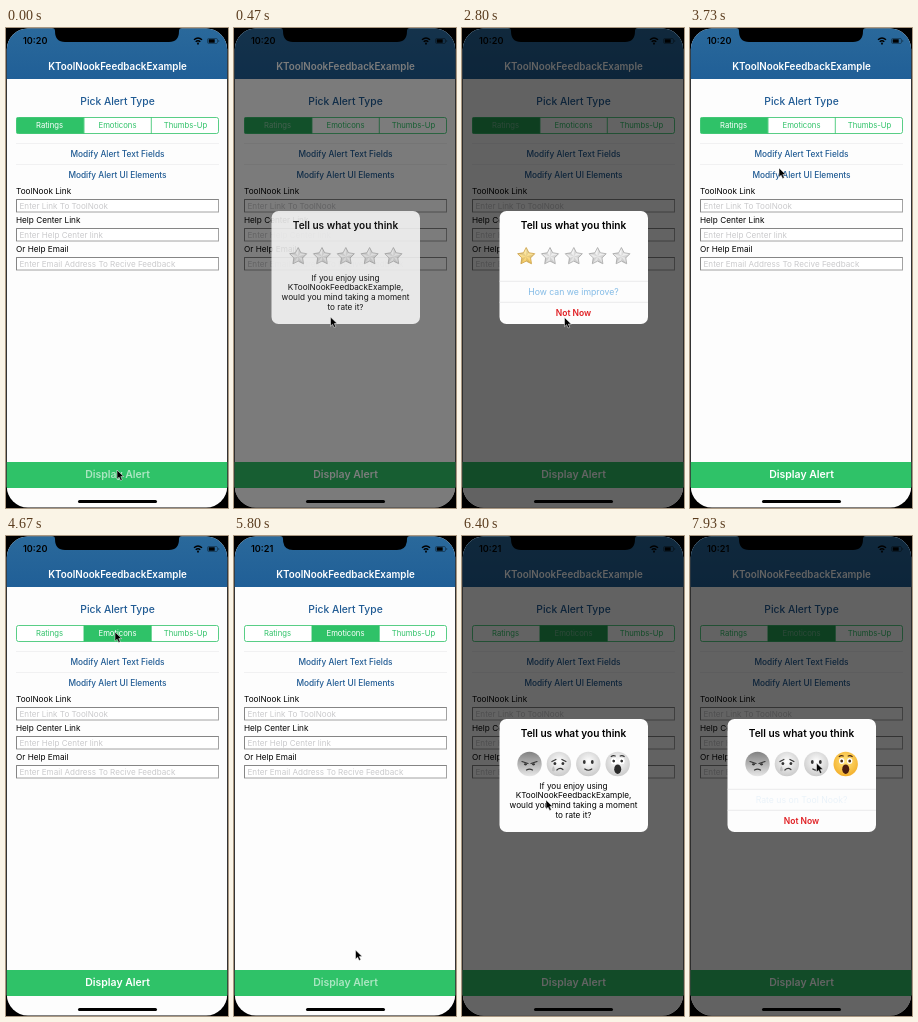
An HTML page that plays this animation: 222 by 480 pixels, repeating every 8000 ms.

```html
<!DOCTYPE html>
<html lang="en">
<head>
<meta charset="utf-8">
<style>
  html, body { margin: 0; width: 100%; height: 100%; overflow: hidden; background: #000; }
  svg { display: block; width: 100%; height: 100%; }
  text { font-family: Inter, Roboto, sans-serif; font-size: 8.2px; }
  .mid { text-anchor: middle; }
  .bold { font-weight: 600; }
  .link { fill: #1f5a93; font-weight: 500; font-size: 8.3px; }
  .hint { fill: #cacacc; font-size: 8.1px; }
  .seg { font-size: 7.7px; }
  .gray { filter: grayscale(1) brightness(1.12); }
</style>
</head>
<body>
<svg viewBox="0 0 222 480">
  <defs>
    <clipPath id="screen"><rect x=".8" y=".5" width="220.4" height="479" rx="21"/></clipPath>
    <linearGradient id="header" x2="0" y2="1"><stop stop-color="#2a699b"/><stop offset="1" stop-color="#205f97"/></linearGradient>
    <linearGradient id="silver" x2="0" y2="1"><stop stop-color="#fcfcfc"/><stop offset="1" stop-color="#dedede"/></linearGradient>
    <linearGradient id="gold" x2="0" y2="1"><stop stop-color="#fff3c0"/><stop offset="1" stop-color="#f6c95c"/></linearGradient>
    <radialGradient id="yellow" cy=".4" r=".6"><stop stop-color="#ffe580"/><stop offset="1" stop-color="#f4b02c"/></radialGradient>
    <linearGradient id="angry" x2="0" y2="1"><stop stop-color="#c4622f"/><stop offset="1" stop-color="#ffc96a"/></linearGradient>
  </defs>

  <g clip-path="url(#screen)">
    <rect width="222" height="480" fill="#fdfdfd"/>
    <rect width="222" height="51" fill="url(#header)"/>
    <text id="clock" class="bold" x="17" y="16.3" style="font-size:9.1px">10:20</text>
    <g fill="none" stroke="#000" stroke-width="1.4">
      <path d="M188 11.8q4-3.6 8 0M189.7 13.8q2.3-2 4.6 0"/>
      <circle cx="192" cy="15.6" r=".4"/>
      <rect x="201.5" y="10.5" width="10" height="5" rx="1.3" stroke-width=".7" opacity=".5"/>
      <path d="M202.7 13h6" stroke-width="3.4"/>
      <path d="M212.7 12v2" stroke-width=".7" opacity=".5"/>
    </g>
    <text class="mid bold" x="111.5" y="41.6" fill="#fff" style="font-size:9.8px">KToolNookFeedbackExample</text>
    <text class="mid link bold" x="111.5" y="76.7" style="font-size:10.3px">Pick Alert Type</text>

    <g id="segments"></g>
    <rect x="10.5" y="89.5" width="202" height="16" rx="2" fill="none" stroke="#2fc268" stroke-width=".8"/>
    <path d="M78 89.5v16M145.3 89.5v16" stroke="#2fc268" stroke-width=".8"/>
    <rect id="tint" y="89.5" width="67.4" height="16" fill="#1c8a48"/>

    <path d="M10 115.5h203M10 136.5h203" stroke="#ececee" stroke-width=".7"/>
    <text class="mid link" x="111.5" y="129">Modify Alert Text Fields</text>
    <text class="mid link" x="111.5" y="150">Modify Alert UI Elements</text>
    <g id="fields"></g>

    <rect y="434" width="222" height="26" fill="#2fc268"/>
    <text id="display" class="mid bold" x="111.5" y="450.4" fill="#fff" style="font-size:10.5px">Display Alert</text>
    <rect x="72" y="472" width="79" height="3" rx="1.5"/>

    <rect id="dim" width="222" height="480"/>
    <g id="alert">
      <rect x="37.5" y="183" width="148.5" height="113" rx="7" fill="#fdfdfd"/>
      <text class="mid bold" x="111.5" y="200.6" style="font-size:10.1px">Tell us what you think</text>
      <g id="stars"></g>
      <g id="faces"></g>
      <g id="message"></g>
      <g id="actions">
        <path d="M37.5 253.3h148.5M37.5 274.3h148.5" stroke="#e2e2e4" stroke-width=".7"/>
        <text id="answer" class="mid" x="111.5" y="267" fill="#83bbe6" style="font-size:8.7px"></text>
        <text class="mid bold" x="111.5" y="288" fill="#e01e22" style="font-size:8.5px">Not Now</text>
      </g>
    </g>
  </g>
  <path d="M46 0h130q-3 0-3 3q0 11-10 11H59q-10 0-10-11q0-3-3-3z"/>
  <path id="cursor" d="M0 0v9.2l2.1-2 1.5 3.3 1.7-.8-1.5-3.1h2.9z" stroke="#fff" stroke-width=".5"/>
</svg>
<script>
const LOOP = 8000;
const $ = id => document.getElementById(id);
const clamp = v => Math.max(0, Math.min(1, v));
const ramp = (t, from, to) => clamp((t - from) / (to - from));
const between = (t, from, to) => t >= from && t < to;
const show = (id, opacity) => $(id).setAttribute('opacity', opacity);
const segmentX = i => 10.5 + i * 67.4;

$('segments').innerHTML = ['Ratings', 'Emoticons', 'Thumbs-Up'].map((label, i) => `
  <rect x="${segmentX(i)}" y="89.5" width="67.4" height="16"/>
  <text class="mid seg" x="${43.5 + i * 68}" y="100.3">${label}</text>`).join('');

$('fields').innerHTML = [
  ['ToolNook Link', 'Enter Link To ToolNook'],
  ['Help Center Link', 'Enter Help Center link'],
  ['Or Help Email', 'Enter Email Address To Recive Feedback']
].map(([label, hint], i) => `<g transform="translate(0 ${i * 29})">
  <text x="10" y="166">${label}</text>
  <rect x="10.5" y="171.5" width="202" height="12.5" fill="#fff" stroke="#a2a2a2"/>
  <path d="M10.5 184v-12.5h202" fill="none" stroke="#858585"/>
  <text class="hint" x="13.5" y="181.2">${hint}</text></g>`).join('');

$('message').innerHTML = ['If you enjoy using', 'KToolNookFeedbackExample,', 'would you mind taking a moment', 'to rate it?']
  .map((line, i) => `<text class="mid" x="111.5" y="${252.6 + i * 9.8}">${line}</text>`).join('');

// Star outline with one shaded facet per arm
const spoke = i => {
  const r = i % 2 ? 4.6 : 9, a = (i / 5 - .5) * Math.PI;
  return `${(r * Math.cos(a)).toFixed(2)} ${(r * Math.sin(a)).toFixed(2)}`;
};
const arms = [0, 1, 2, 3, 4];
const outline = 'M' + [...Array(10).keys()].map(spoke).join('L') + 'Z';
const facets = arms.map(i => `M0 0L${spoke(2 * i)}L${spoke(2 * i + 1)}Z`).join('');
$('stars').innerHTML = arms.map(i => `<g transform="translate(${64.2 + i * 23.8} 228.5)">
  <path class="star" d="${outline}" stroke-width=".9" stroke-linejoin="round"/>
  <path d="${facets}" opacity=".09"/></g>`).join('');

const pair = (y, rx, ry, fill = '#4a2a12') => [-4, 4].map(x =>
  `<ellipse cx="${x}" cy="${y}" rx="${rx}" ry="${ry}" fill="${fill}"/>`).join('');
const stroke = d => `<path d="${d}" fill="none" stroke="#4a2a12" stroke-width="1.2" stroke-linecap="round"/>`;
const features = [
  pair(.3, 1.6, 1.1) + stroke('M-7.5-2.5l6 2M7.5-2.5l-6 2M-3 6q3-1.6 6 0'),
  pair(-.5, 1.4, 1.6) + stroke('M-7-2.5l4-2M7-2.5l-4-2M-2 6q3-3 6-.5') + '<path d="M-5.5 2q-3 5 0 5.5q3-.5 0-5.5" fill="#7ab4dc"/>',
  pair(-2, 1.4, 2.1) + stroke('M-3.5 5q3.5 2.5 7 0'),
  pair(-3, 2.7, 2.9, '#fff') + pair(-3, 1.4, 1.6) + stroke('M-6.5-7.5q2-1.5 4-.5M6.5-7.5q-2-1.5-4-.5') + '<ellipse cy="5.2" rx="3.5" ry="4.8" fill="#4a1d10"/>'
];
$('faces').innerHTML = features.map((face, i) => `<g class="face" transform="translate(${67.5 + i * 29.4} 228)">
  <circle r="12.2" fill="url(#${i ? 'yellow' : 'angry'})"/>${face}</g>`).join('');

const segmentBoxes = document.querySelectorAll('#segments rect');
const segmentLabels = document.querySelectorAll('#segments text');
const stars = document.querySelectorAll('.star');
const faces = document.querySelectorAll('.face');

// Pointer path: time, x, y
const path = [
  [0, 111, 442], [70, 111, 442], [470, 96.5, 289], [1000, 66, 228], [1730, 62, 227], [2470, 62, 227],
  [2800, 102.5, 289.5], [3230, 104, 285], [3730, 89, 140], [4200, 109, 96], [4870, 109, 96],
  [5450, 113, 442], [5680, 113, 442], [5800, 121.5, 414], [6400, 84, 264], [7050, 155, 227],
  [7470, 155, 227], [7930, 126.5, 227], [LOOP, 126.5, 227]
];
function pointer(t) {
  const i = path.findIndex(p => p[0] > t);
  const [a, b] = [path[i - 1], path[i]];
  const k = ramp(t, a[0], b[0]), e = k * k * (3 - 2 * k);
  return [1, 2].map(n => a[n] + (b[n] - a[n]) * e);
}

function draw(t) {
  const emoticons = t >= 4300;
  const rated = between(t, 1300, 4300) || t >= 7350;
  const fade = emoticons ? ramp(t, 5830, 6300) : ramp(t, 150, 530) * (1 - ramp(t, 3300, 3730));

  $('clock').textContent = t < 5000 ? '10:20' : '10:21';
  segmentBoxes.forEach((box, i) => {
    const on = i === +emoticons;
    box.setAttribute('fill', on ? '#2fc268' : '#fff');
    segmentLabels[i].setAttribute('fill', on ? '#fff' : '#2fc268');
  });
  $('tint').setAttribute('x', segmentX(+emoticons));
  show('tint', fade * .6);
  show('display', between(t, 5550, 5850) || t < 150 ? .6 : 1);
  show('dim', fade * .61);
  show('alert', fade);
  show('stars', +!emoticons);
  show('faces', +emoticons);
  show('message', +!rated);
  show('actions', +rated);
  show('answer', emoticons ? ramp(t, 7870, 8270) : ramp(t, 1750, 2130));
  $('answer').textContent = emoticons ? 'Rate us on Tool Nook?' : 'How can we improve?';
  stars.forEach((star, i) => {
    const lit = rated && i === 0;
    star.setAttribute('fill', `url(#${lit ? 'gold' : 'silver'})`);
    star.setAttribute('stroke', lit ? '#d2a850' : '#b0b0b0');
  });
  faces.forEach((face, i) => face.classList.toggle('gray', !(rated && i === 3)));
  $('cursor').setAttribute('transform', `translate(${pointer(t)})`);
}

const start = performance.now();
function tick() {
  draw((performance.now() - start) % LOOP);
  requestAnimationFrame(tick);
}
tick();
</script>
</body>
</html>
```
